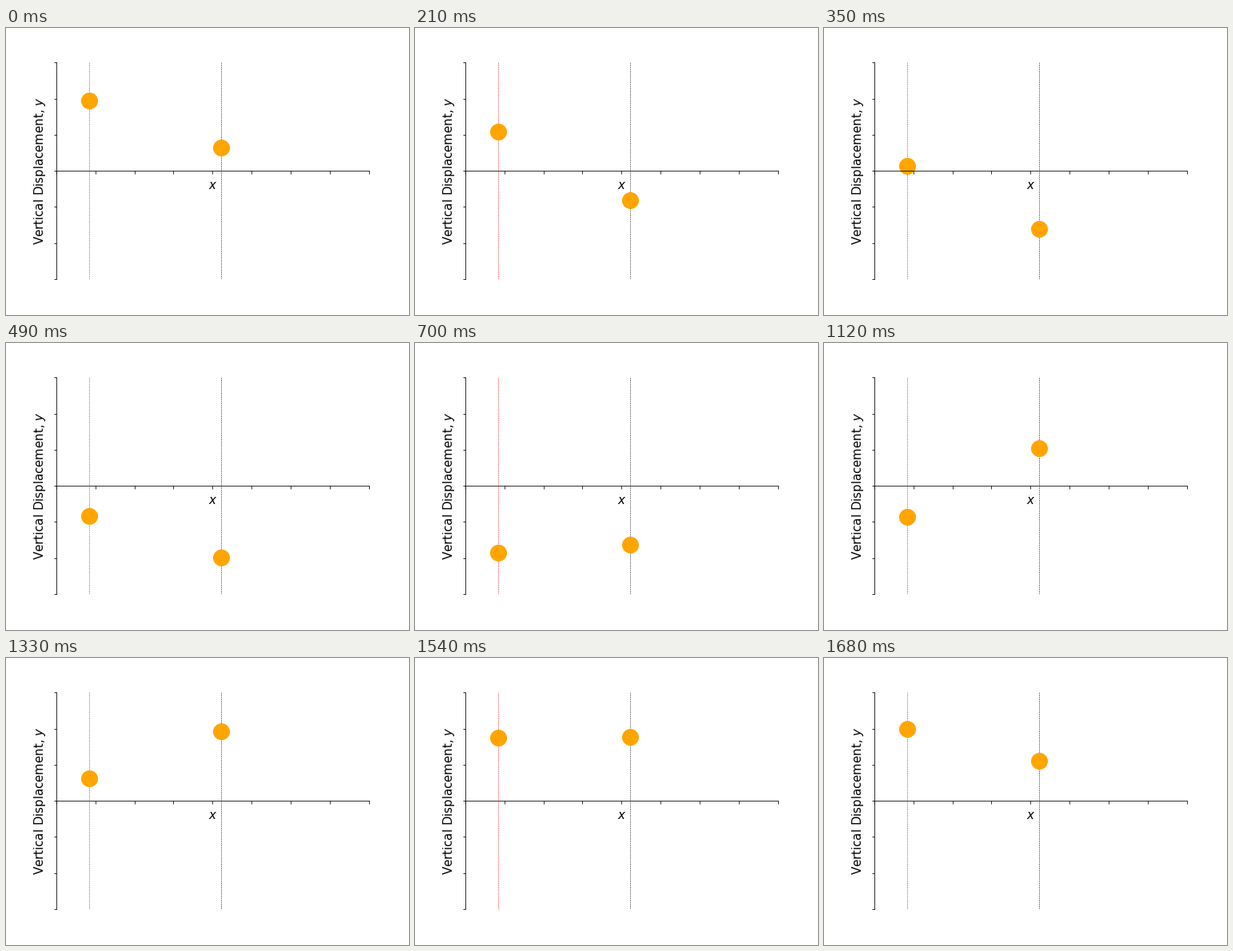
Recreate the animation shown at these times as a matplotlib script. Size 504x360 px, loop 1.75 s.

```python
import numpy as np
import matplotlib.pyplot as plt
from matplotlib.animation import FuncAnimation

FRAMES = 25
INTERVAL = 70
LENGTH = 8
K = 0.75 * np.pi / LENGTH
OMEGA = 2 * np.pi / FRAMES

# Two neighbouring points picked from an evenly spaced row of particles.
spots = np.linspace(0, LENGTH, 20)[[2, 10]]

fig, ax = plt.subplots(figsize=(7, 5), dpi=72)
fig.subplots_adjust(left=0.125, right=0.9, bottom=0.125, top=0.88)

ax.spines[["top", "right"]].set_visible(False)
ax.spines["bottom"].set_position("zero")
ax.set_xlim(0, LENGTH)
ax.set_ylim(-1.5, 1.5)
ax.set_xticks(np.arange(LENGTH + 1))
ax.set_yticks(np.arange(-1.5, 1.6, 0.5))
ax.set_xticklabels([])
ax.set_yticklabels([])
ax.set_xlabel("$x$", fontsize=15)
ax.set_ylabel("Vertical Displacement, $y$", fontsize=15)

for x, color in zip(spots, ("red", "black")):
    ax.axvline(x, color=color, linestyle="--", linewidth=0.5)

balls, = ax.plot([], [], "o", color="orange", markersize=20)


def update(frame):
    balls.set_data(spots, np.cos(K * spots + OMEGA * frame))
    return balls,


anim = FuncAnimation(fig, update, frames=FRAMES, interval=INTERVAL,
                     repeat=True, repeat_delay=0)
plt.show()
```
